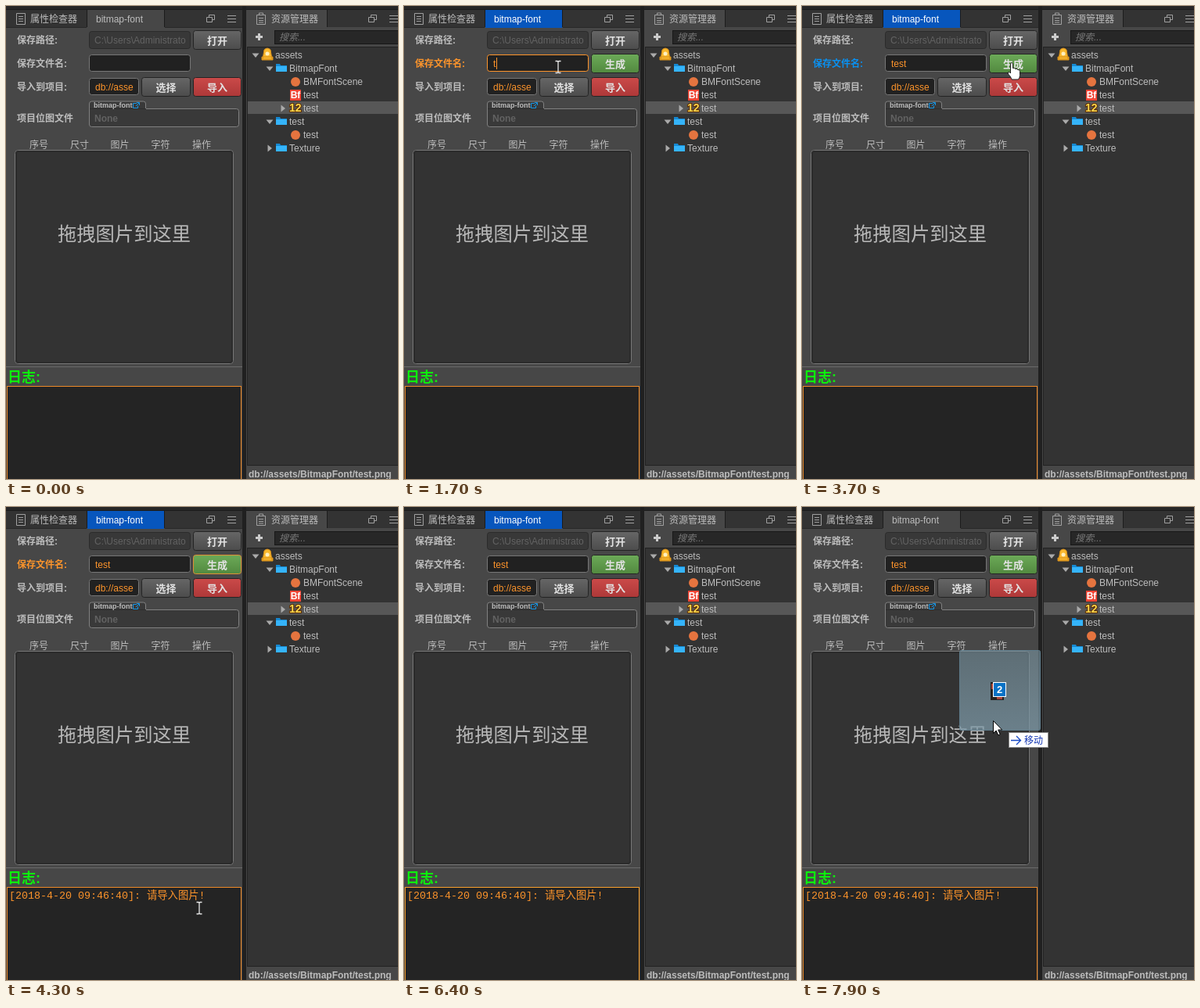
An HTML page that plays this animation: 501 by 605 pixels, repeating every 8000 ms.

```html
<!DOCTYPE html>
<html lang="zh-CN">
<head>
<meta charset="utf-8">
<title>bitmap-font</title>
<style>
html, body { margin: 0; width: 100%; height: 100%; overflow: hidden; background: #222; }
svg { display: block; width: 501px; height: 605px; }
text { font: 12px "Liberation Sans", "Noto Sans CJK SC", "Noto Sans CJK", sans-serif; fill: #bdbdbd; white-space: pre; }
.label, .button text, .bold { font-weight: bold; }
.button text { font-size: 13px; fill: #e2e2e2; text-anchor: middle; }
.button rect { stroke: #242424; }
.input { fill: #212121; stroke: #777; }
.orange { fill: #fd942b; }
.label.hover { fill: #0991f2; }
.label.focus { fill: #fd942b; }
.stroke { fill: none; stroke: #a0a0a0; }
#log { font: 13.333px "Liberation Mono", "Noto Sans CJK SC", "Noto Sans CJK", monospace; }
</style>
</head>
<body>
<svg viewBox="0 0 501 605">
  <defs>
    <linearGradient id="grey" x2="0" y2="1"><stop stop-color="#666"/><stop offset="1" stop-color="#4c4c4c"/></linearGradient>
    <linearGradient id="red" x2="0" y2="1"><stop stop-color="#cb4a49"/><stop offset="1" stop-color="#ad3838"/></linearGradient>
    <linearGradient id="green" x2="0" y2="1"><stop stop-color="#6caa58"/><stop offset="1" stop-color="#52893f"/></linearGradient>
    <linearGradient id="glass" x2="0" y2="1"><stop stop-color="#78929e" stop-opacity=".62"/><stop offset="1" stop-color="#7d99a7" stop-opacity=".75"/></linearGradient>
    <clipPath id="pathClip"><rect x="107" y="33" width="123" height="22"/></clipPath>
    <clipPath id="headClip"><rect y="165" width="302" height="19"/></clipPath>
    <g id="panelIcons" class="stroke">
      <path d="M3.500 3.500V.5h7v6h-3M.5 3.500h7v6h-7z"/>
      <path d="M27 1.500h11M27 5.500h11M27 9.500h11"/>
    </g>
    <g id="folder"><path d="M0 1h5l1 2h8v8H0z" fill="#1689d2"/><path d="M0 4h14v7H0z" fill="#35b4fa"/></g>
    <path id="open" d="M-4.500-2.500h9L0 3z" fill="#aaa"/>
    <path id="closed" d="M-2.500-4.500v9L3 0z" fill="#aaa"/>
    <circle id="scene" r="6" fill="#e5743f"/>
  </defs>

  <!-- left panel -->
  <rect width="501" height="605" fill="#262626"/>
  <rect y="5" width="302" height="23" fill="#333"/>
  <rect y="27" width="302" height="578" fill="#474747"/>
  <path d="M0 4.500h302M103.500 5v22M202.500 5v22" stroke="#1c1c1c"/>
  <path d="M0 27.500h103M203 27.500h99" stroke="#292929"/>
  <rect id="tab" x="104" y="5" width="98" height="23" fill="#474747"/>
  <path class="stroke" d="M13.500 9.500h11v14h-11zM16 13.500h6M16 16.500h6M16 19.500h6"/>
  <text x="31" y="21">属性检查器</text>
  <text id="tabText" x="115" y="21">bitmap-font</text>
  <use href="#panelIcons" x="256" y="11"/>

  <text class="label" x="14" y="48">保存路径:</text>
  <text class="label" x="14" y="78">保存文件名:</text>
  <text class="label" x="14" y="108">导入到项目:</text>
  <text class="label" x="14" y="148">项目位图文件</text>

  <rect x="106.500" y="32.500" width="129" height="22" rx="3" fill="#383838" stroke="#2b2b2b"/>
  <text x="113" y="48" style="fill:#636363" clip-path="url(#pathClip)">C:\Users\Administrator</text>
  <rect id="nameBox" class="input" x="106.500" y="62.500" width="129" height="21" rx="3"/>
  <text id="nameText" x="114" y="78" style="fill:#fd942b"></text>
  <rect id="nameCaret" y="66" width="1" height="15" fill="#fd942b"/>
  <rect class="input" x="106.500" y="92.500" width="63" height="21" rx="3"/>
  <text x="114" y="108" style="fill:#fd942b">db://asse</text>

  <g class="button"><rect x="239.500" y="31.500" width="61" height="24" rx="3" fill="url(#grey)"/><text x="270" y="49">打开</text></g>
  <g class="button" id="make"><rect id="makeBox" x="239.500" y="61.500" width="61" height="24" rx="3" fill="url(#green)"/><text x="270" y="79">生成</text></g>
  <g class="button"><rect x="173.500" y="91.500" width="62" height="24" rx="3" fill="url(#grey)"/><text x="204.500" y="109">选择</text></g>
  <g class="button"><rect x="239.500" y="91.500" width="61" height="24" rx="3" fill="url(#red)"/><text x="270" y="109">导入</text></g>

  <path d="M106.500 152v-27q0-3 3-3h66q3 0 3 3v6.500h116q3 0 3 3v17q0 3-3 3h-185q-3 0-3-3z" fill="#393939" stroke="#818181"/>
  <path d="M107 131.500h72" stroke="#2d2d2d"/>
  <text class="bold" x="112" y="130" style="font-size:9px">bitmap-font</text>
  <path d="M167 124.500h-4.500v6h6v-3M166 128l4-4M167 123.500h3.500v3.500" fill="none" stroke="#1597e8"/>
  <text class="bold" x="113" y="148" style="fill:#626262">None</text>

  <g clip-path="url(#headClip)" class="bold">
    <text x="30" y="182">序号</text><text x="82" y="182">尺寸</text><text x="133.500" y="182">图片</text>
    <text x="185.500" y="182">字符</text><text x="238" y="182">操作</text>
  </g>
  <rect x="11.500" y="184.500" width="279" height="273" rx="4" fill="#333" stroke="#777"/>
  <rect x="13" y="186" width="276" height="270" rx="3" fill="none" stroke="#2b2b2b" stroke-width="2"/>
  <text class="bold" x="66" y="300" style="font-size:24.300px;font-weight:500;fill:#b8b8b8">拖拽图片到这里</text>
  <path d="M0 461.500h302" stroke="#6a6a6a"/>
  <text class="bold" x="2" y="481" style="font-size:18px;fill:#0df20d">日志:</text>
  <rect id="logBox" x="1.500" y="486.500" width="299" height="125" fill="#242424" stroke="#ee8a27"/>
  <text id="log" x="4" y="501" style="fill:#fd942b">[2018-4-20 09:46:40]: 请导入图片!</text>
  <rect id="logCaret" x="156" y="489" width="1" height="16" fill="#fd942b"/>

  <!-- right panel -->
  <rect x="302" width="5" height="605" fill="#202020"/>
  <rect x="307" y="5" width="194" height="23" fill="#333"/>
  <rect x="307" y="5" width="103" height="23" fill="#474747"/>
  <path d="M307 4.500h194M410.500 5v22" stroke="#1c1c1c"/>
  <rect x="307" y="27" width="194" height="578" fill="#474747"/>
  <path class="stroke" d="M320.500 11.500h11v12h-11zM323.500 11v-2h5v2M323 15.500h6M323 18.500h6M323 21h6"/>
  <text x="339" y="21">资源管理器</text>
  <use href="#panelIcons" x="463" y="11"/>
  <path d="M319 39.500h9M323.500 35v9" stroke="#ccc" stroke-width="3"/>
  <rect x="343.500" y="31.500" width="165" height="17" fill="#272727" stroke="#171717"/>
  <text x="349" y="44" style="font-style:italic;fill:#777">搜索...</text>
  <rect x="308.500" y="52.500" width="200" height="535" fill="#333" stroke="#222"/>
  <rect x="309" y="122" width="192" height="16" fill="#575757"/>
  <g>
    <use href="#open" x="319" y="63"/>
    <path d="M328 68l2-12q4-4 8 0l2 12zM327 65h14v4h-14z" fill="#fab92e" stroke="#d8901b"/>
    <circle cx="334" cy="61" r="2.500" fill="#fff0c0"/>
    <text x="344" y="67">assets</text>
    <use href="#open" x="337" y="80"/><use href="#folder" x="345" y="73"/><text x="362" y="84">BitmapFont</text>
    <use href="#scene" x="370" y="97"/><text x="380" y="101">BMFontScene</text>
    <rect x="363" y="107" width="14" height="14" fill="#ef4535"/>
    <text class="bold" x="370" y="118" text-anchor="middle" style="fill:#fff">Bf</text>
    <text x="380" y="118">test</text>
    <use href="#closed" x="354" y="131"/>
    <text class="bold" x="362" y="135" style="font-size:14px;fill:#ffd84a;stroke:#5a2d08;stroke-width:2px;paint-order:stroke">12</text>
    <text x="380" y="135">test</text>
    <use href="#open" x="337" y="148"/><use href="#folder" x="345" y="141"/><text x="362" y="152">test</text>
    <use href="#scene" x="370" y="165"/><text x="380" y="169">test</text>
    <use href="#closed" x="337" y="182"/><use href="#folder" x="345" y="175"/><text x="362" y="186">Texture</text>
  </g>
  <text class="bold" x="310" y="603">db://assets/BitmapFont/test.png</text>

  <!-- dragged item, placed by its top left corner -->
  <g id="drag">
    <rect x=".5" y=".5" width="103" height="102" rx="2" fill="url(#glass)" stroke="#5f7c8b"/>
    <path d="M40 41h17v23H40z" fill="#25211f"/><path d="M41 43h3v7h-3zM48 60h7v3h-7z" fill="#a9473a"/>
    <rect x="43.500" y="41.500" width="16" height="18" fill="#0872c6" stroke="#fff"/>
    <text class="bold" x="51.500" y="55" text-anchor="middle" style="font-size:13px;fill:#fff">2</text>
    <rect x="63.500" y="105.500" width="50" height="19" fill="#fff" stroke="#8b8b8b"/>
    <path id="dragIcon" fill="none" stroke="#1748c4"/>
    <text id="dragText" x="83" y="120" style="fill:#1437b4"></text>
  </g>

  <g id="cursor">
    <path id="arrow" d="M.5.500v16l3.700-3.500 2.600 5.800 2.400-1-2.500-5.800h5z" fill="#fff" stroke="#000"/>
    <path id="beam" d="M-3.500-7.500h2.500l1 1 1-1h2.500M0-7V7M-3.500 7.500h2.500l1-1 1 1h2.500" fill="none" stroke="#e8e8e8" stroke-width="1.300"/>
    <path id="hand" d="M-1.500 1.500q1.500-2 3 0v6q3-1 3 1 3-1 3 1 3-.5 3 2v5q0 3-2 5.500H0q-1-4-4.500-7-1-3 1.500-2.500l1.500 1.500z" fill="#fff" stroke="#222"/>
  </g>
</svg>
<script>
const LOOP = 8000, STEP = 100;
const $ = id => document.getElementById(id);
const show = (id, on) => $(id).style.display = on ? '' : 'none';
const within = (t, from, to) => t >= from && t < to;
const latest = (keys, t) => keys.findLast(key => key[0] <= t) || [];
const labels = document.querySelectorAll('.label');

// time, x, y, pointer, hovered row
const pointer = [
  [300, 369, 85, 'arrow'], [400, 315, 83, 'arrow'], [500, 258, 81, 'arrow', 1],
  [600, 213, 79, 'beam', 1], [700, 197, 78, 'beam', 1],
  [2900, 205, 270, 'arrow'], [3000, 225, 238, 'arrow'], [3100, 252, 190, 'arrow'],
  [3200, 276, 142, 'arrow', 3], [3300, 286, 113, 'hand', 3], [3400, 282, 94, 'hand', 2],
  [3500, 275, 78, 'hand', 1], [3600, 270, 73, 'hand', 1], [3700, 268, 72, 'hand', 1],
  [3900, 262, 98, 'hand', 2], [4000, 256, 190, 'arrow'], [4100, 250, 340, 'arrow'],
  [4200, 248, 485, 'beam'], [4300, 247, 513, 'beam'], [4400, 244, 511, 'beam'],
  [4500, 236, 508, 'beam'], [4600, 228, 505, 'beam'], [4700, 190, 502, 'beam'],
  [4800, 156, 500, 'beam'], [4900, 128, 499, 'beam'],
  [5100, 150, 497, 'beam'], [5200, 240, 450, 'arrow'], [5300, 350, 395, 'arrow'],
  [5400, 482, 337, 'arrow'], [5500],
  [7700, 395, 270, 'arrow'], [7800, 325, 276, 'arrow'], [7900, 244, 273, 'arrow']
];
// time, left, top, moving instead of copying
const drags = [[7700, 353, 177, false], [7800, 282, 183, false], [7900, 201, 183, true]];
// time, letters typed, caret x
const typing = [[1200, 0, 114], [1700, 1, 118], [1900, 2, 124], [2100, 3, 129], [2300, 4, 134]];

function drawPointer(t) {
  const [, x, y, kind] = latest(pointer, t);
  show('cursor', kind);
  if (!kind) return;
  $('cursor').setAttribute('transform', `translate(${x} ${y})`);
  for (const shape of ['arrow', 'beam', 'hand']) show(shape, shape === kind);
}

function drawDrag(t) {
  const [start, x, y, moving] = latest(drags, t);
  show('drag', start);
  if (!start) return;
  $('drag').setAttribute('transform', `translate(${x} ${y})`);
  $('dragText').textContent = moving ? '移动' : '复制';
  $('dragIcon').setAttribute('d', moving ? 'M66 115.500h12M73 110l5.500 5.500-5.500 5.500' : 'M68 115.500h10M73 110.500v10');
  $('dragIcon').setAttribute('stroke-width', moving ? 1.3 : 2);
}

function draw(t) {
  const nameFocus = within(t, 1200, 2900), makeFocus = within(t, 3800, 4500);
  const logFocus = within(t, 4500, 7200), tabFocus = within(t, 1200, 7200);
  const [, letters = 0, caretX = 114] = latest(typing, t);
  const hovered = latest(pointer, t)[4];

  $('tab').setAttribute('fill', tabFocus ? '#0756bd' : '#474747');
  $('tabText').style.fill = tabFocus ? '#fff' : '#bdbdbd';
  labels.forEach((label, row) => {
    label.classList.toggle('hover', row === hovered);
    label.classList.toggle('focus', row === 1 && (nameFocus || makeFocus));
  });
  $('nameBox').style.stroke = nameFocus ? '#fd942b' : '#777';
  $('nameText').textContent = 'test'.slice(0, letters);
  $('nameCaret').setAttribute('x', caretX);
  show('nameCaret', within(t, 1200, 2700));
  show('make', letters);
  $('makeBox').style.stroke = makeFocus ? '#e09035' : '#242424';
  $('logBox').setAttribute('stroke', logFocus ? '#fba02b' : '#ee8a27');
  show('log', t >= 3800);
  show('logCaret', within(t, 4900, 5500) || within(t, 6000, 6400));
  drawDrag(t);
  drawPointer(t);
}

const start = performance.now();
function tick() {
  const t = (performance.now() - start) % LOOP;
  draw(Math.floor(t / STEP) * STEP);
  requestAnimationFrame(tick);
}
tick();
</script>
</body>
</html>
```
